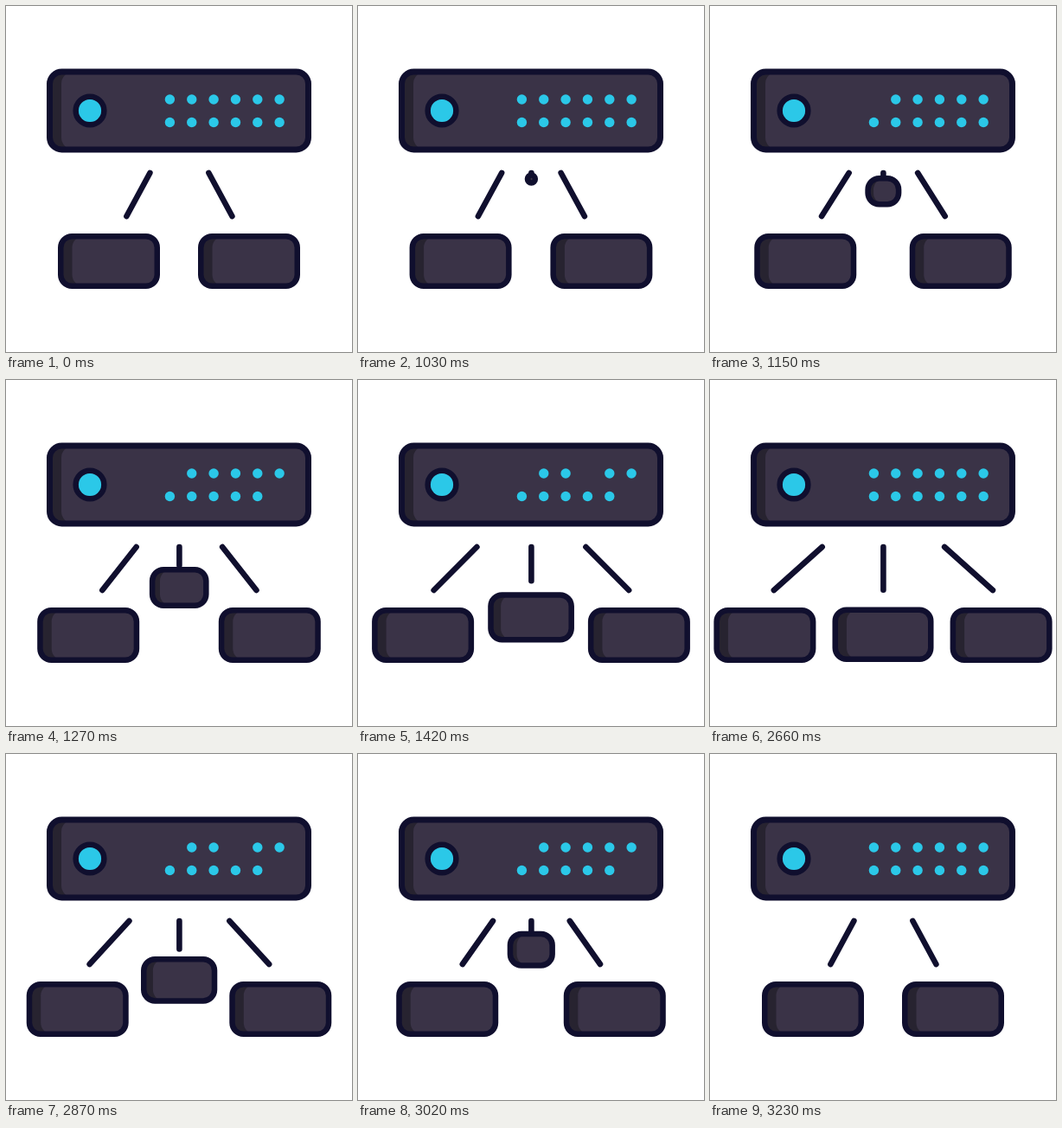
An HTML page that plays this animation: 400x400 px, repeating every 3.26 s.

```html
<!DOCTYPE html>
<html lang="en">
<head>
<meta charset="utf-8">
<title>Server nodes</title>
<style>
  html, body { margin: 0; width: 100%; height: 100%; overflow: hidden; background: #fff; }
  svg { display: block; width: 100%; height: 100%; }
  .shade { fill: #272330; }
  .face { fill: #3a3347; }
  .rim { fill: none; stroke: #100f2e; }
  .link { stroke: #100f2e; stroke-width: 6.6; stroke-linecap: round; }
  .light { fill: #2bc8e8; }
</style>
</head>
<body>
<svg id="stage" viewBox="0 0 400 400"></svg>
<script>
const LOOP = 3260, TICK = 30, STEPS = 20;
const OPEN_AT = 1000, CLOSE_AT = 2630;
const stage = document.getElementById('stage');

function add(tag, attrs, parent = stage) {
  const node = document.createElementNS('http://www.w3.org/2000/svg', tag);
  set(node, attrs);
  parent.append(node);
  return node;
}

function set(node, attrs) {
  for (const key in attrs) node.setAttribute(key, attrs[key]);
}

const lerp = (a, b, p) => a + (b - a) * p;
const clamp = v => Math.min(1, Math.max(0, v));
const smooth = t => t * t * (3 - 2 * t);
const show = (node, on) => { node.style.visibility = on ? 'visible' : 'hidden'; };

// A rounded case with a shaded left edge, placed by its centre.
function makeCase(stroke) {
  const group = add('g', {});
  const [shade, face, rim] = ['shade', 'face', 'rim'].map(name => add('rect', { class: name }, group));
  rim.setAttribute('stroke-width', stroke);
  return {
    group,
    place(cx, cy, width, height, radius, edge) {
      const x = cx - width / 2, y = cy - height / 2;
      const rx = Math.min(radius, width / 2, height / 2);
      const inset = stroke / 2 + edge;
      set(shade, { x, y, width, height, rx });
      set(rim, { x, y, width, height, rx });
      set(face, { x: x + inset, y, width: Math.max(0, width - inset), height, rx });
    }
  };
}

makeCase(7).place(200, 121, 299, 90, 14, 10);
add('circle', { class: 'rim', cx: 97, cy: 121, r: 16.3, 'stroke-width': 6.6 });
add('circle', { class: 'light', cx: 97, cy: 121, r: 13.1 });

const lights = Array.from({ length: 12 }, (_, i) => add('circle', {
  class: 'light', cx: 189.4 + 25.35 * (i % 6), cy: i < 6 ? 108 : 134.5, r: 5.7
}));
// Light index, then the part of the opening during which it is dark.
const blinks = [[0, 0.2, 0.8], [11, 0.25, 0.75], [3, 0.5, 0.9]];

const links = [-1, 0, 1].map(side => ({ side, node: add('line', { class: 'link' }) }));
const outer = [-1, 1].map(side => ({ side, box: makeCase(6.5) }));
const middle = makeCase(6.5);

function draw(t) {
  const p = smooth(t);

  for (const { side, node } of links) {
    const top = side * lerp(34, 71, p), bottom = side * lerp(61, 127, p);
    set(node, {
      x1: 200.4 + top, y1: 193,
      x2: 200.4 + bottom, y2: side ? 243 : lerp(193, 243, p)
    });
    show(node, side || t > 0);
  }

  for (const { side, box } of outer) {
    box.place(200 + side * lerp(81, 137, p), 295, 111.5, 57.5, 13, 10);
  }

  const grow = t < 1 ? 1 - Math.exp(-t / 0.17) : 1;
  const width = grow * lerp(34, 111.5, p);
  const height = grow * lerp(35.5, 57.5, p);
  middle.place(200.4 - 0.4 * p, lerp(199.3, 295, p), width, height, 13, width * 0.09);
  show(middle.group, t > 0);

  for (const [index, from, to] of blinks) show(lights[index], t <= from || t >= to);
}

const start = performance.now();
function frame() {
  const time = (performance.now() - start) % LOOP;
  const progress = from => clamp(Math.floor((time - from) / TICK) / STEPS);
  draw(progress(OPEN_AT) - progress(CLOSE_AT));
  requestAnimationFrame(frame);
}
frame();
</script>
</body>
</html>
```
